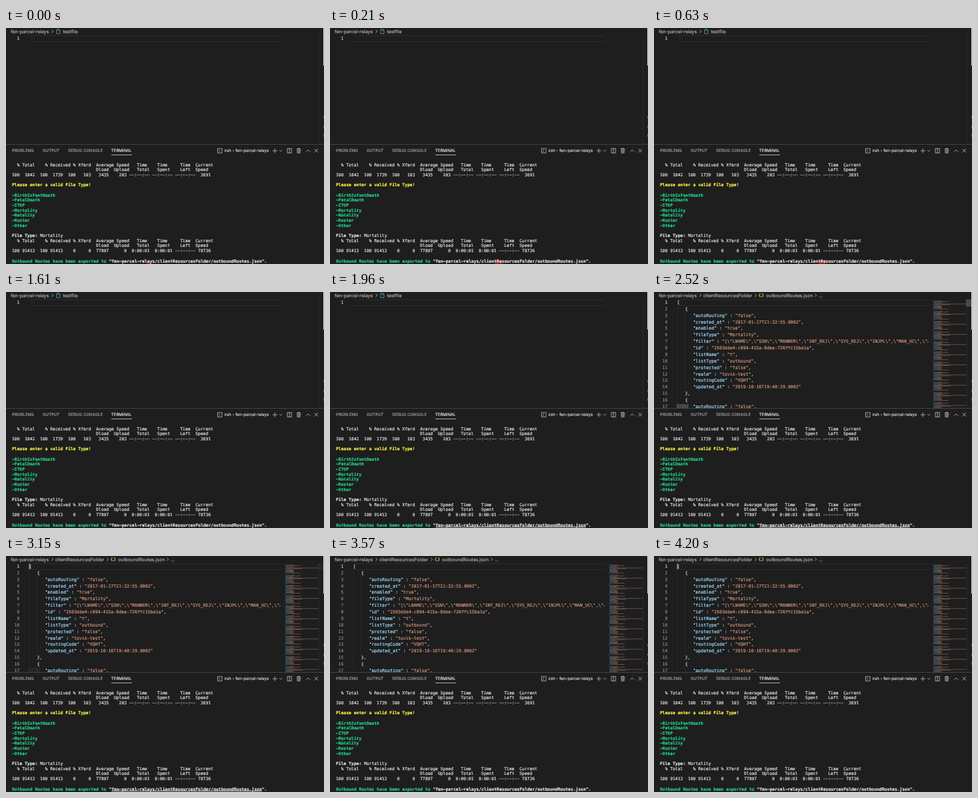
Animation, 480 px wide and 358 px high, one loop 4.27 s. Source, as an HTML page:

```html
<!DOCTYPE html>
<html lang="en">
<head>
<meta charset="utf-8">
<title>Editor and terminal</title>
<style>
  html, body { margin: 0; width: 100%; height: 100%; overflow: hidden; background: #1e1e1e; }
  svg { display: block; width: 100vw; height: 100vh; }
  text { white-space: pre; text-rendering: geometricPrecision; stroke-width: .2; }
  .mono { font-family: "DejaVu Sans Mono", monospace; }
  .ui { font-family: Inter, sans-serif; }
  .icon { fill: none; stroke: #c5c5c5; stroke-width: .8; }
</style>
</head>
<body>
<svg id="stage" viewBox="0 0 480 358">
  <defs>
    <clipPath id="codeArea"><rect x="34" y="10" width="380" height="166"/></clipPath>
    <clipPath id="mapArea"><rect x="418" y="11" width="53.5" height="165"/></clipPath>
  </defs>
  <path d="M35 11.5H414M35 20.5H414" stroke="#2d2d2d"/>
  <path d="M472.5 11V176" stroke="#292929"/>
  <path d="M479.5 0V57" stroke="#dcdcdc"/>
  <path d="M479.5 134v3M479.5 148v3M479.5 161v4" stroke="#666"/>
  <g id="emptyFile"></g>
  <g id="jsonFile">
    <path d="M35.2 20.5V176M46.9 30.5V149M46.9 169V176" stroke="#363636" stroke-width=".5"/>
    <g id="minimap" clip-path="url(#mapArea)" opacity=".7"></g>
    <g id="code" clip-path="url(#codeArea)"></g>
    <path id="scrollbars" d="M471 11h8v11h-8zM34 170h18v6h-18z" fill="#797979" fill-opacity=".45"/>
    <rect id="caret" x="34.8" y="11.6" width="1" height="8.6" fill="#c0c0bd"/>
  </g>
  <path d="M0 176.5H480" stroke="#434343"/>
  <path d="M159 192.5H190" stroke="#d8d8d8" stroke-width=".8"/>
  <g id="panel"></g>
  <g class="icon">
    <path d="M319.4 182.8h6.6v6.8h-6.6zM321.2 184.6l1.7 1.6l-1.7 1.6"/>
    <path d="M402.3 186.2h7M405.8 182.7v7"/>
    <path d="M413 185.3l1.8 1.8l1.8-1.8"/>
    <path d="M424.7 182.8h6.4v6.8h-6.4zM427.9 182.8v6.8"/>
    <path d="M438.7 183.7h6.4M440.7 183.5v-1h2.4v1M439.6 183.9l.3 5.8h4l.3-5.8M441.2 185v3.6M442.7 185v3.6"/>
    <path d="M453.4 187.7l2.8-2.8l2.8 2.8"/>
    <path d="M465.5 183.4l5.4 5.4M470.9 183.4l-5.4 5.4"/>
  </g>
  <circle id="pointer" fill="#951d1d"/>
  <g id="terminal"></g>
  <rect id="underline" x="159.2" y="356.4" width="227.2" height=".8" fill="#e5e5e5"/>
</svg>
<script>
const byId = id => document.getElementById(id);
const PROJECT = 'fen-parcel-relays';
const WHITE = '#e5e5e5', GREEN = '#23d18b', YELLOW = '#f5f543', GREY = '#acacac';
const KEY = '#9cdcfe', STRING = '#ce9178', PLAIN = '#d4d4d4';

function add(parent, tag, attrs, content = '') {
  const node = document.createElementNS('http://www.w3.org/2000/svg', tag);
  for (const name in attrs) node.setAttribute(name, attrs[name]);
  node.textContent = content;
  byId(parent).append(node);
}
const text = (parent, font, size, x, y, fill, content, more = {}) =>
  add(parent, 'text', { class: font, 'font-size': size, x, y, fill, stroke: fill, ...more }, content);

// Breadcrumbs
const crumb = (parent, x, content) => text(parent, 'ui', 7.05, x, 7.5, GREY, content);
const chevron = (parent, x) =>
  add(parent, 'path', { d: `M${x} 3l2.2 2.2l-2.2 2.2`, class: 'icon' });

for (const parent of ['emptyFile', 'jsonFile']) {
  crumb(parent, 7, PROJECT);
  chevron(parent, 69);
}
add('emptyFile', 'path', {
  d: 'M76.6 2h3.2l1.8 1.8v4.8h-5zM79.6 2v2h2', fill: 'none', stroke: '#519aba', 'stroke-width': .9
});
crumb('emptyFile', 86, 'testfile');
crumb('jsonFile', 74.3, 'clientResourcesFolder');
chevron('jsonFile', 152.3);
text('jsonFile', 'ui', 6.2, 158, 7.4, '#cbcb41', '{.}', { 'font-weight': 700 });
crumb('jsonFile', 169, 'outboundRoutes.json');
chevron('jsonFile', 243);
crumb('jsonFile', 248.5, '…');

// Editor
const CODE_SIZE = 6.61, CODE_CHAR = CODE_SIZE * .602, LINE = 9.87;
const columns = ['LNAME', 'SSN', 'MANNER', 'INT_REJ', 'SYS_REJ', 'INJPL', 'MAN_UC', 'ACME_UC'];
const record = Object.entries({
  autoRouting: 'false',
  created_at: '2017-01-17T21:32:55.000Z',
  enabled: 'true',
  fileType: 'Mortality',
  filter: '[' + columns.map(name => `\\"${name}\\"`).join(',') + ']',
  id: '2503dde4-c094-415a-8dee-726ffc15ba1a',
  listName: 't',
  listType: 'outbound',
  protected: 'false',
  realm: 'tovik-test',
  routingCode: 'VQHT',
  updated_at: '2019-10-16T19:40:29.000Z'
});

// Each line is a list of [column, colour, text] pieces.
function codeLine(index) {
  if (index === 0) return [[0, PLAIN, '[']];
  const row = (index - 1) % 14;
  if (row === 0) return [[3, PLAIN, '{']];
  if (row === 13) return [[3, PLAIN, '},']];
  const [name, value] = record[row - 1];
  const key = `"${name}"`, string = `"${value}"`, start = 6 + key.length;
  return [
    [6, KEY, key], [start, PLAIN, ' : '], [start + 3, STRING, string],
    [start + 3 + string.length, PLAIN, row < 12 ? ',' : '']
  ];
}

const lineNumber = (parent, index) =>
  text(parent, 'mono', CODE_SIZE, 20.4, 18 + index * LINE, index ? '#858585' : '#c6c6c6',
    index + 1, { 'text-anchor': 'end' });

lineNumber('emptyFile', 0);
for (let i = 0; i < 17; i++) {
  lineNumber('jsonFile', i);
  for (const [column, fill, content] of codeLine(i))
    text('code', 'mono', CODE_SIZE, 35 + column * CODE_CHAR, 18 + i * LINE, fill, content);
}

const MAP_CHAR = .55, MAP_LINE = 1.1;
for (let i = 0; i < 150; i++)
  for (const [column, fill, content] of codeLine(i))
    add('minimap', 'rect', {
      x: 418.5 + column * MAP_CHAR, y: 11.1 + i * MAP_LINE,
      width: content.length * MAP_CHAR, height: .8,
      fill, opacity: fill === STRING ? .75 : .45
    });

// Panel tabs
const tab = (x, content, fill = '#a0a0a0', size = 6.1) => text('panel', 'ui', size, x, 188.4, fill, content);
tab(9.3, 'PROBLEMS');
tab(55.3, 'OUTPUT');
tab(93.9, 'DEBUG CONSOLE');
tab(158.8, 'TERMINAL', '#e7e7e7');
tab(329.5, 'zsh - ' + PROJECT, '#cccccc', 6.2);

// Terminal; minus signs stand for hyphens because the terminal font draws them long.
const TERM_SIZE = 6.4, TERM_CHAR = TERM_SIZE * .602;
const print = (row, content, fill = WHITE, bold = false, column = 0) =>
  text('terminal', 'mono', TERM_SIZE, 9 + column * TERM_CHAR, 209.6 + row * 7.68, fill,
    content.replaceAll('-', '−'), { 'font-weight': bold ? 700 : 400 });

function transfer(row, numbers) {
  print(row, '  % Total    % Received % Xferd  Average Speed   Time    Time     Time  Current');
  print(row + 1, ' '.repeat(33) + 'Dload  Upload   Total   Spent    Left  Speed');
  print(row + 2, numbers);
}
transfer(0, '100  1842  100  1739  100   103   3435    203 --:--:-- --:--:-- --:--:--  3691');
print(4, 'Please enter a valid File Type!', YELLOW, true);
['BirthInfantDeath', 'FetalDeath', 'ITOP', 'Mortality', 'Natality', 'Roster', 'Other']
  .forEach((type, i) => print(6 + i, '-' + type, GREEN, true));
print(14, 'File Type:', WHITE, true);
print(14, 'Mortality', WHITE, false, 11);
transfer(15, '100 91413  100 91413    0     0  77807      0  0:00:01  0:00:01 --:--:-- 78736');
print(19, 'Outbound Routes have been exported to', GREEN, true);
print(19, `"${PROJECT}/clientResourcesFolder/outboundRoutes.json".`, WHITE, true, 38);

// Animation
const LOOP = 4270, OPEN = 2030;
const show = (id, visible) => byId(id).setAttribute('visibility', visible ? 'visible' : 'hidden');
const within = (t, from, to) => t >= from && t < to;
const clamp = value => Math.max(0, Math.min(1, value));

function render() {
  const t = performance.now() % LOOP;
  const opened = t >= OPEN;
  byId('emptyFile').style.display = opened ? 'none' : '';
  byId('jsonFile').style.display = opened ? '' : 'none';
  show('caret', !within(t, 2520, 3010) && !within(t, 3570, 4060));
  show('underline', within(t, 1680, 3220));
  // The scrollbars wait half a second after opening, then fade out.
  byId('scrollbars').setAttribute('opacity', 1 - clamp((t - OPEN - 500) / 800));

  const step = Math.min(3, Math.floor(t / 70)) / 3;
  const pointer = byId('pointer');
  pointer.setAttribute('cx', 216 + 38 * step);
  pointer.setAttribute('cy', 359 - step);
  pointer.setAttribute('r', 4 + 2 * step);
  show('pointer', t < 1610);
  requestAnimationFrame(render);
}
render();
</script>
</body>
</html>
```
